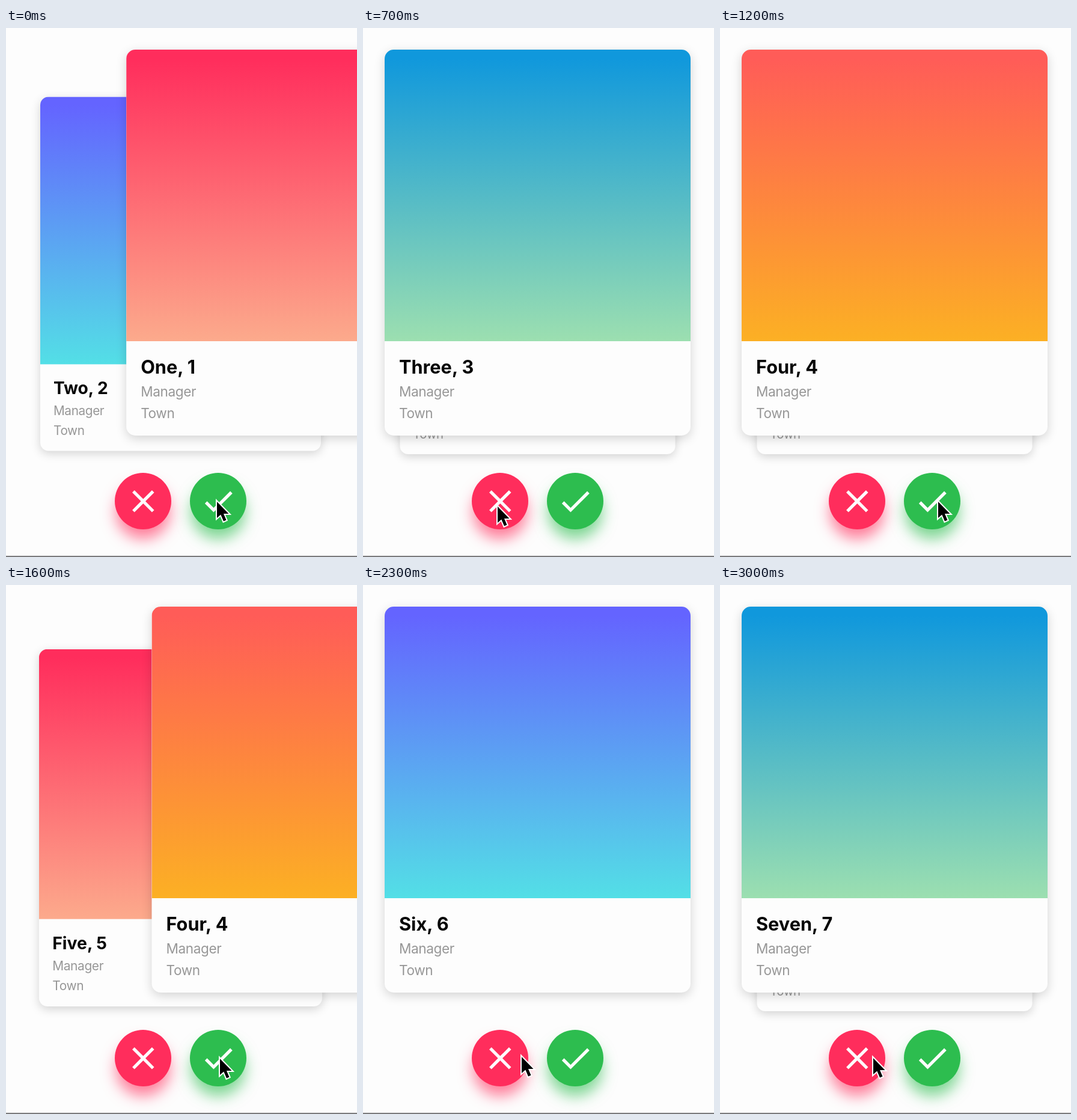
These frames come from a looping animation (584 by 880 pixels, 3.1 s). An HTML page:

```html
<!DOCTYPE html>
<html lang="en">
<head>
<meta charset="utf-8">
<title>Card swipe</title>
<style>
  html, body { margin: 0; width: 584px; height: 880px; overflow: hidden; background: #fdfdfd; }
  body { position: relative; font-family: Inter, sans-serif; }
  body > * { position: absolute; }
  .card {
    left: 36px; top: 36px; width: 509px; height: 642px;
    border-radius: 15px; overflow: hidden; background: #fdfdfd;
    box-shadow: 0 5px 17px rgba(0, 0, 0, .17);
  }
  .card > * { position: absolute; left: 24px; margin: 0; white-space: nowrap; }
  .card .cover { left: 0; top: 0; width: 100%; height: 485px; }
  .card h1 { top: 508px; font-size: 30.7px; line-height: 40px; color: #050505; }
  .card p { font-size: 22.6px; line-height: 30px; letter-spacing: -.4px; color: #979797; }
  .role { top: 554px; }
  .place { top: 590px; }
  .button { top: 740px; width: 94px; height: 94px; border-radius: 50%; }
  .button svg { position: absolute; left: 15.7px; top: 16.2px; width: 62.6px; fill: #fdfdfd; }
  .no { left: 181px; background: #ff2d5c; box-shadow: 0 18px 25px -2px rgba(255, 45, 92, .62); }
  .yes { left: 306px; background: #2dbd4f; box-shadow: 0 18px 25px -2px rgba(45, 189, 79, .62); }
  #press {
    left: -31px; top: -30px; width: 64px; height: 64px; box-sizing: border-box; border-radius: 50%;
    background: rgba(200, 190, 195, .83); border: 2px solid rgba(145, 145, 145, .7);
  }
  #cursor { left: 0; top: 0; overflow: visible; }
  #edge { left: 0; top: 878px; width: 584px; height: 2px; background: #7b7b7d; }
</style>
</head>
<body>
<div class="card" id="back"><div class="cover"></div><h1></h1><p class="role">Manager</p><p class="place">Town</p></div>
<div class="card" id="front"><div class="cover"></div><h1></h1><p class="role">Manager</p><p class="place">Town</p></div>
<div class="button no"><svg viewBox="0 0 24 24"><path d="M19 6.41 17.59 5 12 10.59 6.41 5 5 6.41 10.59 12 5 17.59 6.41 19 12 13.41 17.59 19 19 17.59 13.41 12z"/></svg></div>
<div class="button yes"><svg viewBox="0 0 24 24"><path d="M9 16.17 4.83 12 3.41 13.41 9 19 21 7 19.59 5.59z"/></svg></div>
<div id="edge"></div>
<div id="press"></div>
<svg id="cursor" width="24" height="36"><path d="M0 0V27L6.3 21.5 11 32.5 15.5 30.5 11 20H19.5z" fill="#000" stroke="#fff" stroke-width="4" paint-order="stroke"/></svg>
<script>
const LOOP = 3100, SWIPE = 195, DISTANCE = 1131;
const names = ['One', 'Two', 'Three', 'Four', 'Five', 'Six', 'Seven', 'Eight'];
const gradients = [['#ff2d5c', '#fcaa8c'], ['#6464ff', '#53dfe6'], ['#1098dc', '#9cdfb0'], ['#ff5c58', '#fcb024']];
// start time, direction
const swipes = [[-27.3, 1], [504, 1], [985, -1], [1565.4, 1], [2108, -1], [2640, -1]];
// time, x, y of the pointer tip
const path = [
  [0, 351, 788], [504, 351, 788], [700, 224, 796], [985, 224, 796], [1200, 363, 788], [1400, 356, 788],
  [1620, 356, 788], [1900, 264, 785], [2300, 264, 785], [2600, 255, 787], [LOOP, 255, 787]
];

const $ = id => document.getElementById(id);
const smooth = v => v * v * (3 - 2 * v);

// cubic-bezier(.25, .1, .25, 1)
function ease(x) {
  let lo = 0, hi = 1, s;
  for (let i = 0; i < 24; i++) {
    s = (lo + hi) / 2;
    if (.75 * s * (1 - s) + s ** 3 < x) lo = s; else hi = s;
  }
  return .3 * s * (1 - s) ** 2 + 3 * s * s * (1 - s) + s ** 3;
}

function showCard(card, index, transform) {
  if (card.dataset.index !== String(index)) {
    card.dataset.index = index;
    card.querySelector('h1').textContent = `${names[index]}, ${index + 1}`;
    card.querySelector('.cover').style.background = `linear-gradient(${gradients[index % 4].join(' 3%, ')})`;
  }
  card.style.transform = transform;
}

function pointer(t) {
  const i = path.findIndex(key => key[0] > t);
  const [t0, x0, y0] = path[i - 1], [t1, x1, y1] = path[i];
  const k = smooth((t - t0) / (t1 - t0));
  return `translate(${x0 + (x1 - x0) * k}px, ${y0 + (y1 - y0) * k}px)`;
}

function draw(t) {
  const k = swipes.findLastIndex(([start]) => start <= t);
  const [start, direction] = swipes[k];
  const progress = (t - start) / SWIPE;
  const done = progress >= 1;
  const index = done ? k + 1 : k;
  // The front card leaves at constant speed while the next one eases up
  const shift = done ? 0 : direction * DISTANCE * progress;
  const rest = done ? 1 : 1 - ease(progress);
  showCard($('front'), index, `translateX(${shift}px)`);
  showCard($('back'), index + 1, `translateY(${63 * rest}px) scale(${1 - .1 * rest})`);

  $('cursor').style.transform = $('press').style.transform = pointer(t);
  const pressed = swipes.some(([s]) => t > s - 140 && t < s);
  $('press').style.visibility = pressed ? 'visible' : 'hidden';
}

function tick() {
  draw(performance.now() % LOOP);
  requestAnimationFrame(tick);
}
tick();
</script>
</body>
</html>
```
